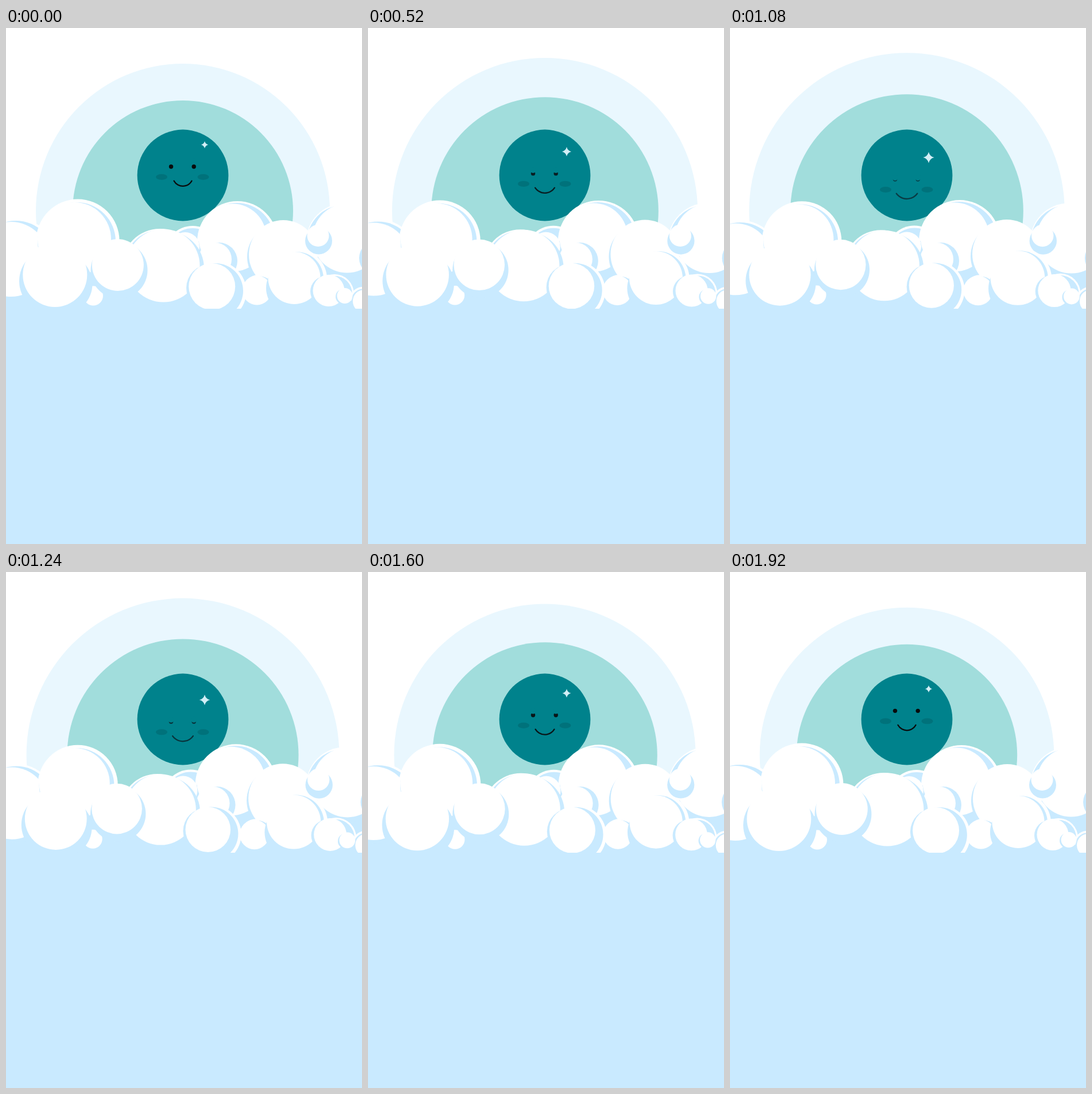
Write an HTML page with a canvas that moves like this. It is 620 px wide and 897 px high and loops after 1.96 s.

```html
<!DOCTYPE html>
<html lang="en">
<head>
<meta charset="utf-8">
<title>Moon over clouds</title>
<style>
  html, body { margin: 0; width: 100%; height: 100%; overflow: hidden; background: #fff; }
  canvas { display: block; width: 620px; height: 897px; }
</style>
</head>
<body>
<canvas id="stage" width="620" height="897"></canvas>
<script>
const ctx = document.getElementById('stage').getContext('2d');
const LOOP = 1960, STEP = 40, CYCLE = 2000;
const WHITE = '#fff', SKY = '#c9eaff', MOON = '#00828c';
const PI = Math.PI;
let swell = 0; // 0 = rest, 1 = fully breathed in

const mix = (a, b, k = swell) => a + (b - a) * k;

function disc(x, y, r, color, from = 0, to = 2 * PI) {
  ctx.fillStyle = color;
  ctx.beginPath();
  ctx.arc(x, y, r, from, to);
  ctx.fill();
}

const puff = (x, y, r) => disc(x, y, r, WHITE);
const shade = (x, y, r) => disc(x, y, r, SKY);
const rim = (x, y, r) => disc(x, y, r, WHITE, PI, 2 * PI);

// Draws one cloud, moved by dx, dy and scaled about x, y as it swells
function cloud(x, y, dx, dy, scale, draw) {
  const s = mix(1, scale);
  ctx.save();
  ctx.translate(x + dx * swell, y + dy * swell);
  ctx.scale(s, s);
  ctx.translate(-x, -y);
  draw();
  ctx.restore();
}

function drawHalo() {
  disc(308, 318, mix(256, 275), '#e9f7fe');
  disc(308, 318, mix(192, 203), '#a1dddc');
}

function drawStar(x, y, s) {
  const c = s * 0.2;
  ctx.fillStyle = '#d2eef6';
  ctx.beginPath();
  ctx.moveTo(x, y - s);
  ctx.quadraticCurveTo(x + c, y - c, x + s, y);
  ctx.quadraticCurveTo(x + c, y + c, x, y + s);
  ctx.quadraticCurveTo(x - c, y + c, x - s, y);
  ctx.quadraticCurveTo(x - c, y - c, x, y - s);
  ctx.fill();
}

function drawMoon() {
  const dy = 22.4 * swell;
  const k = Math.pow(swell, 1.5);
  const ink = `rgb(9,${mix(11, 61, k)},${mix(12, 70, k)})`;
  disc(308, 256, 79.4, MOON);
  drawStar(346, 203 + dy, mix(6.2, 9.7));

  for (const x of [271, 343.5]) {
    ctx.fillStyle = '#00727b';
    ctx.beginPath();
    ctx.ellipse(x, 259 + dy, 10, 5, 0, 0, 2 * PI);
    ctx.fill();
  }
  for (const x of [287.5, 327.2]) {
    const y = 241 + dy;
    disc(x, y, 3.7, ink);
    disc(x, y + mix(-9.2, -2.8), 5, MOON);
  }

  const half = mix(15.5, 18.3), depth = 9.2;
  const r = (half * half + depth * depth) / (2 * depth);
  const a = Math.asin(half / r);
  ctx.strokeStyle = ink;
  ctx.lineWidth = 2.3;
  ctx.lineCap = 'round';
  ctx.beginPath();
  ctx.arc(308, 265.7 + dy + depth - r, r, PI / 2 - a, PI / 2 + a);
  ctx.stroke();
}

function drawRightClouds() {
  cloud(592, 366, 0.5, 0.5, 1.01, () => {
    rim(590, 372, 67.5);
    shade(588, 372, 64);
    puff(594, 365.5, 60);
  });
  cloud(645, 400, 3, 0, 1, () => shade(645, 400, 30));
}

function drawMiddleClouds() {
  cloud(325, 393, -4, -0.5, 1, () => {
    rim(325, 393, 49);
    shade(325, 393, 45);
    puff(312, 380, 25);
  });
  cloud(398, 366, -3, -1, 1.015, () => {
    rim(403, 371, 70);
    shade(402, 370, 66);
    puff(394.5, 364.5, 59);
  });
  cloud(364, 402, -4, 0, 1, () => {
    shade(371, 405, 32);
    puff(364, 402, 29);
  });
  cloud(483, 394, -1, -1, 1, () => {
    shade(478, 398, 58);
    puff(483, 394, 60);
  });
  cloud(544, 366, 0.8, 0, 1.01, () => {
    shade(544.5, 370, 23.5);
    puff(543.5, 361, 19);
  });
}

function drawLeftClouds() {
  cloud(17, 404, 1, 0, 0.957, () => {
    rim(17, 404, 73);
    shade(17, 404, 69);
    puff(9, 402, 65);
  });
  cloud(125, 370, 0, 0.5, 0.955, () => {
    rim(125, 370, 72.5);
    shade(123, 371, 68);
    puff(119, 367, 64);
  });
  cloud(274, 413, -5.5, 0, 0.965, () => {
    rim(268, 415, 66);
    shade(269, 414, 63);
    shade(280, 418, 65);
    puff(274, 413, 63.5);
  });
  cloud(152, 465.5, -1, -1.5, 0.97, () => puff(152, 465.5, 17));
  cloud(85, 429, 1.7, 0, 0.957, () => {
    shade(80, 440, 57);
    shade(98, 445, 52.5);
    puff(85.3, 429, 56);
  });
  cloud(194.5, 412, -2, -0.5, 0.97, () => {
    shade(197, 421, 49.5);
    puff(194.8, 412, 45);
  });
}

function drawFrontClouds() {
  cloud(437, 456, -5, 0.5, 1.01, () => {
    rim(440, 457, 28);
    shade(442, 457, 25.5);
    puff(437, 456, 25.5);
  });
  cloud(358.5, 449.5, -8, -2, 0.965, () => {
    disc(366, 458, 52.5, WHITE, -PI / 2, PI / 2);
    shade(365, 457, 48);
    shade(355, 452, 41);
    puff(358.7, 449.5, 40.5);
  });
  cloud(502, 434.5, -1, 0, 1.04, () => {
    rim(508, 436, 51);
    shade(506, 436, 47);
    shade(500, 452, 47);
    puff(502, 434.5, 45.5);
  });
  cloud(562, 457, 3, 0, 1.04, () => {
    rim(572, 462, 34);
    shade(572, 462, 31);
    shade(556.5, 458, 26.5);
    puff(562, 456.5, 27.5);
  });
  cloud(622, 474, 5, 0, 1, () => {
    rim(622, 474, 24);
    shade(622, 474, 20.5);
    puff(624, 475, 20);
  });
  cloud(590, 465.5, 5, 1, 1.03, () => {
    shade(587, 467, 13);
    puff(590, 465.5, 13.5);
  });
}

function fillSea(y) {
  ctx.fillStyle = SKY;
  ctx.fillRect(0, y, 620, 897 - y);
}

function render(ms) {
  const t = Math.floor((ms % LOOP) / STEP) * STEP;
  swell = 0.5 - 0.5 * Math.cos(2 * PI * t / CYCLE);
  ctx.clearRect(0, 0, 620, 897);
  drawHalo();
  drawMoon();
  fillSea(385);
  drawRightClouds();
  drawMiddleClouds();
  drawLeftClouds();
  drawFrontClouds();
  fillSea(488);
}

const start = performance.now();
function tick() {
  render(performance.now() - start);
  requestAnimationFrame(tick);
}
tick();
</script>
</body>
</html>
```
